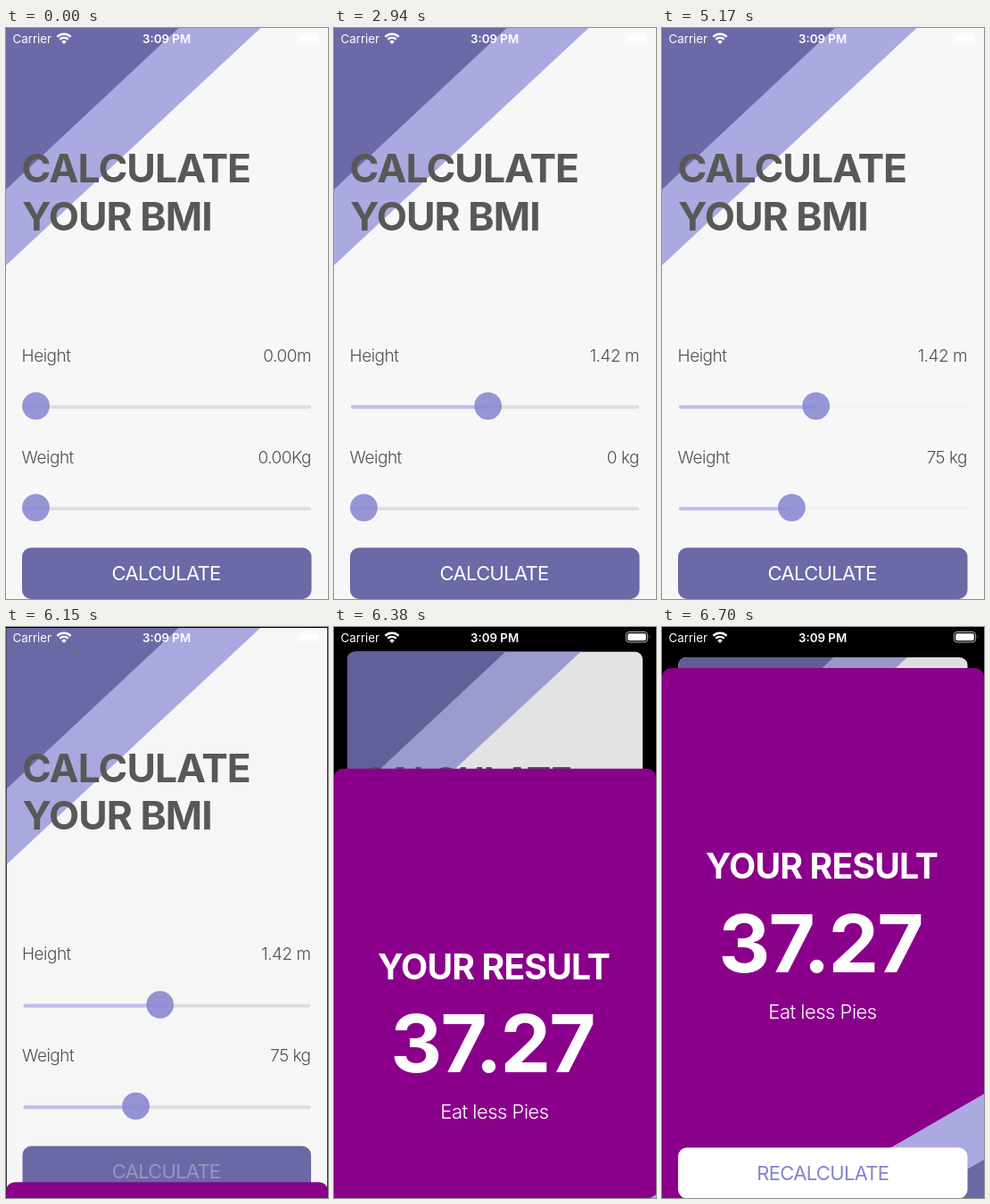
These frames come from a looping animation (361 px wide and 640 px high, 8000 ms). An HTML page:

```html
<!DOCTYPE html>
<html lang="en">
<head>
<meta charset="utf-8">
<title>BMI calculator</title>
<style>
  html, body { margin: 0; height: 100%; overflow: hidden; background: #000; }
  svg { display: block; width: 100vw; height: 100vh; font-family: Inter, "Open Sans", sans-serif; }
  .title { font-weight: 700; letter-spacing: -.022em; }
  .label { font-size: 19px; font-weight: 300; letter-spacing: -.5px; fill: #525252; }
  .button { font-size: 22px; letter-spacing: -.7px; }
  .end { text-anchor: end; }
  .middle { text-anchor: middle; }
  .track { stroke-width: 4; stroke-linecap: round; }
</style>
</head>
<body>
<svg viewBox="0 0 361 640">
  <defs>
    <clipPath id="pageClip"><rect id="pageCorners" width="361" height="660"/></clipPath>
  </defs>
  <rect width="361" height="640"/>

  <g id="page"><g clip-path="url(#pageClip)">
    <rect width="361" height="660" fill="#f7f7f7"/>
    <path d="M0 0H285.5L0 266Z" fill="#aaa9e0"/>
    <path d="M0 0H193.5L0 181Z" fill="#6b69a6"/>
    <g class="title" font-size="44.5" fill="#585858">
      <text x="17.5" y="173.3">CALCULATE</text>
      <text x="18" y="227">YOUR BMI</text>
    </g>
    <g id="sliders"></g>
    <rect x="18" y="582.5" width="324.5" height="57.5" rx="10" fill="#6b69a6"/>
    <text id="calculate" class="button middle" x="179.6" y="619" fill="#fff">CALCULATE</text>
    <rect id="dim" width="361" height="660"/>
  </g></g>

  <g id="sheet">
    <rect y="46" width="361" height="620" rx="10" fill="#8b008b"/>
    <path d="M361 523.3V640H159Z" fill="#aaa9e0"/>
    <path d="M361 597V640H286Z" fill="#6b69a6"/>
    <g class="middle" fill="#fff">
      <text class="title" x="179" y="282" font-size="39.2">YOUR RESULT</text>
      <text class="title" x="177.5" y="386.5" font-size="90">37.27</text>
      <text x="180" y="438.5" font-size="22" font-weight="300" letter-spacing="-.5">Eat less Pies</text>
    </g>
    <rect x="18" y="583.5" width="324.5" height="57" rx="10" fill="#fff"/>
    <text class="button middle" x="180.3" y="620" fill="#8583cf">RECALCULATE</text>
  </g>

  <g fill="#fff" font-size="13.3">
    <text x="7.5" y="16.5">Carrier</text>
    <text class="middle" x="180.1" y="16.5" font-weight="600">3:09 PM</text>
    <path d="M65 18l-2.8-2.8a4 4 0 0 1 5.6 0Z"/>
    <path d="M60.2 12.9a6.8 6.8 0 0 1 9.6 0M57.4 9.9a10.8 10.8 0 0 1 15.2 0" fill="none" stroke="#fff" stroke-width="2.3"/>
    <rect x="327.5" y="5.5" width="24" height="11.5" rx="3.2" fill="none" stroke="#fff" stroke-opacity=".7"/>
    <rect x="329.2" y="7.2" width="20.6" height="8.1" rx="1.8"/>
    <path d="M353 9.3q1.6 2 0 4Z" opacity=".6"/>
  </g>
</svg>
<script>
const LOOP = 8000;
const $ = id => document.getElementById(id);

// Each list holds [start time, value]; a value stays until the next one.
const heights = [[0, 0], [1140, .36], [1260, .73], [2940, 1.42]];
const weights = [[0, 0], [3050, 13], [3170, 38], [3290, 62], [3550, 67], [3890, 69],
  [4000, 70], [4140, 71], [4660, 77], [4850, 76], [5170, 75]];
const sheetSteps = [[0, 0], [6150, .03], [6260, .25], [6380, .81], [6480, .95], [6590, .99], [6700, 1]];
const at = (steps, t) => steps.findLast(([start]) => start <= t)[1];

function makeSlider(name, y) {
  const group = document.createElementNS("http://www.w3.org/2000/svg", "g");
  group.innerHTML = `
    <text class="label" x="17.6" y="${y - 50.5}">${name}</text>
    <text class="label end" x="342" y="${y - 50.5}"></text>
    <path class="track" d="M21 ${y + .8}H340"/>
    <path class="track" stroke="#bfbeeb"/>
    <circle cy="${y - .4}" r="15.4" fill="#8b89d2" fill-opacity=".9"/>`;
  $("sliders").append(group);
  const [, value, track, fill, thumb] = group.children;
  return (text, fraction, trackColor) => {
    const x = 33.5 + 294 * fraction;
    value.textContent = text;
    track.setAttribute("stroke", trackColor);
    fill.setAttribute("d", `M21 ${y + .8}H${x}`);
    thumb.setAttribute("cx", x);
  };
}

const setHeight = makeSlider("Height", 424);
const setWeight = makeSlider("Weight", 538);

function draw(t) {
  const height = at(heights, t), weight = at(weights, t), p = at(sheetSteps, t);
  const trackColor = t >= 5170 && t < 6010 ? "#f3f3f3" : "#dedede";
  setHeight(t < 1140 ? "0.00m" : height.toFixed(2) + " m", height / 3, trackColor);
  setWeight(t < 2940 ? "0.00Kg" : weight + " kg", weight / 197, trackColor);
  $("calculate").setAttribute("opacity", t >= 6010 && t < 6260 ? .3 : 1);

  // The page shrinks back while the result sheet rises.
  const inset = 18.3 * p;
  $("page").setAttribute("transform", `translate(${inset} ${34 * p}) scale(${1 - 2 * inset / 361})`);
  $("pageCorners").setAttribute("rx", Math.min(10, 30 * p));
  $("dim").setAttribute("opacity", .1 * p);
  $("sheet").setAttribute("transform", `translate(0 ${594 * (1 - p)})`);
  $("sheet").setAttribute("visibility", p ? "visible" : "hidden");
}

const begin = performance.now();
function tick() {
  draw((performance.now() - begin) % LOOP);
  requestAnimationFrame(tick);
}
tick();
</script>
</body>
</html>
```
